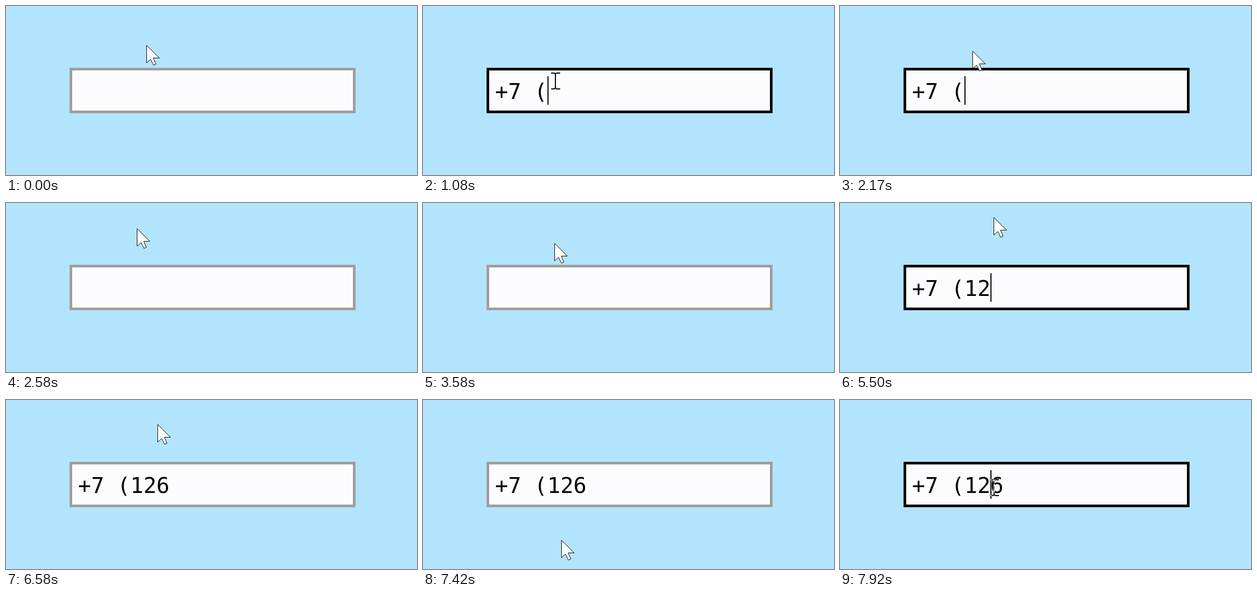
An HTML page with a canvas that plays this animation: 776 by 320 pixels, repeating every 8 s.

```html
<!DOCTYPE html>
<html lang="en">
<head>
<meta charset="utf-8">
<title>Phone field</title>
<style>
  html, body { margin: 0; width: 100%; height: 100%; overflow: hidden; background: #b3e4fe; }
  canvas { display: block; }
</style>
</head>
<body>
<canvas id="stage" width="776" height="320"></canvas>
<script>
const ctx = document.getElementById('stage').getContext('2d');
const TICKS = 96, FPS = 12, BLINK = 0.53 * FPS;
const FIELD = { x: 120, y: 117, w: 540, h: 86, border: 5 };
const CHAR = 24.6, PREFIX = '+7 (', CODE = '126';

// Field states; caret is the column, absent when blurred
const typed = n => PREFIX + CODE.slice(0, n);
const focus = (at, text, caret = text.length) => ({ at, text, caret });
const blur = (at, text) => ({ at, text });
const STATES = [
  blur(0, ''),
  focus(12.1, PREFIX),
  blur(31, ''),
  focus(47.6, PREFIX),
  ...[1, 2, 3].map(n => focus(63.2 + n, typed(n))),
  blur(79, typed(3)),
  focus(94, typed(3), 6)
];

// Pointer glides: last tick at rest, arrival tick, x, y
const START = [265, 74];
const GLIDES = [
  [3, 4, 243, 62], [5, 9, 250, 142],
  [22, 26, 250, 85], [26, 30, 247, 48],
  [42, 43, 248, 76], [43, 45, 254, 143], [45, 48, 265, 147],
  [48, 50, 273, 89], [50, 54, 290, 27],
  [72, 75, 290, 48], [76, 77, 286, 46],
  [80, 85, 255, 285], [88, 94, 291, 166]
];

function pointerAt(n) {
  let [x, y] = START;
  for (const [from, to, toX, toY] of GLIDES) {
    const k = Math.min(1, Math.max(0, (n - from) / (to - from)));
    x += (toX - x) * k;
    y += (toY - y) * k;
  }
  return [Math.round(x), Math.round(y)];
}

function rect(color, x, y, w, h) {
  ctx.fillStyle = color;
  ctx.fillRect(x, y, w, h);
}

function drawArrow(x, y) {
  ctx.save();
  ctx.translate(x + 0.5, y + 0.5);
  const shape = new Path2D('M0 0V33L7.5 26.5L13 37.5L17.5 35.5L12.5 24H24Z');
  ctx.fillStyle = '#fff';
  ctx.fill(shape);
  ctx.strokeStyle = '#000';
  ctx.lineWidth = 1;
  ctx.stroke(shape);
  ctx.restore();
}

// Text pointer inverts what lies beneath it
function drawBeam(x, y) {
  ctx.save();
  ctx.translate(x, y);
  ctx.globalCompositeOperation = 'difference';
  ctx.strokeStyle = '#fff';
  ctx.lineWidth = 2;
  ctx.stroke(new Path2D('M-8 -15H-2L0 -13L2 -15H9M0 -13V13M-8 15H-2L0 13L2 15H9'));
  ctx.restore();
}

function draw(n) {
  const { x, y, w, h, border } = FIELD;
  const { at, text, caret } = STATES.findLast(s => s.at <= n);
  const focused = caret !== undefined;

  rect('#b3e4fe', 0, 0, 776, 320);
  rect(focused ? '#000' : '#9e9e9e', x, y, w, h);
  rect('#fcfcfe', x + border, y + border, w - 2 * border, h - 2 * border);

  ctx.fillStyle = '#000';
  ctx.font = '41px "DejaVu Sans Mono", monospace';
  ctx.fillText(text, 136, 176);

  if (focused && Math.floor((n - at) / BLINK) % 2 === 0) {
    rect('#000', Math.round(235 + (caret - PREFIX.length) * CHAR), 133, 2, 54);
  }

  const [px, py] = pointerAt(n);
  const inside = px >= x && px < x + w && py >= y && py < y + h;
  (inside ? drawBeam : drawArrow)(px, py);
}

function frame() {
  // Small lead keeps ticks on 10 ms boundaries
  draw(Math.floor((performance.now() + 4) * FPS / 1000) % TICKS);
  requestAnimationFrame(frame);
}
frame();
</script>
</body>
</html>
```
